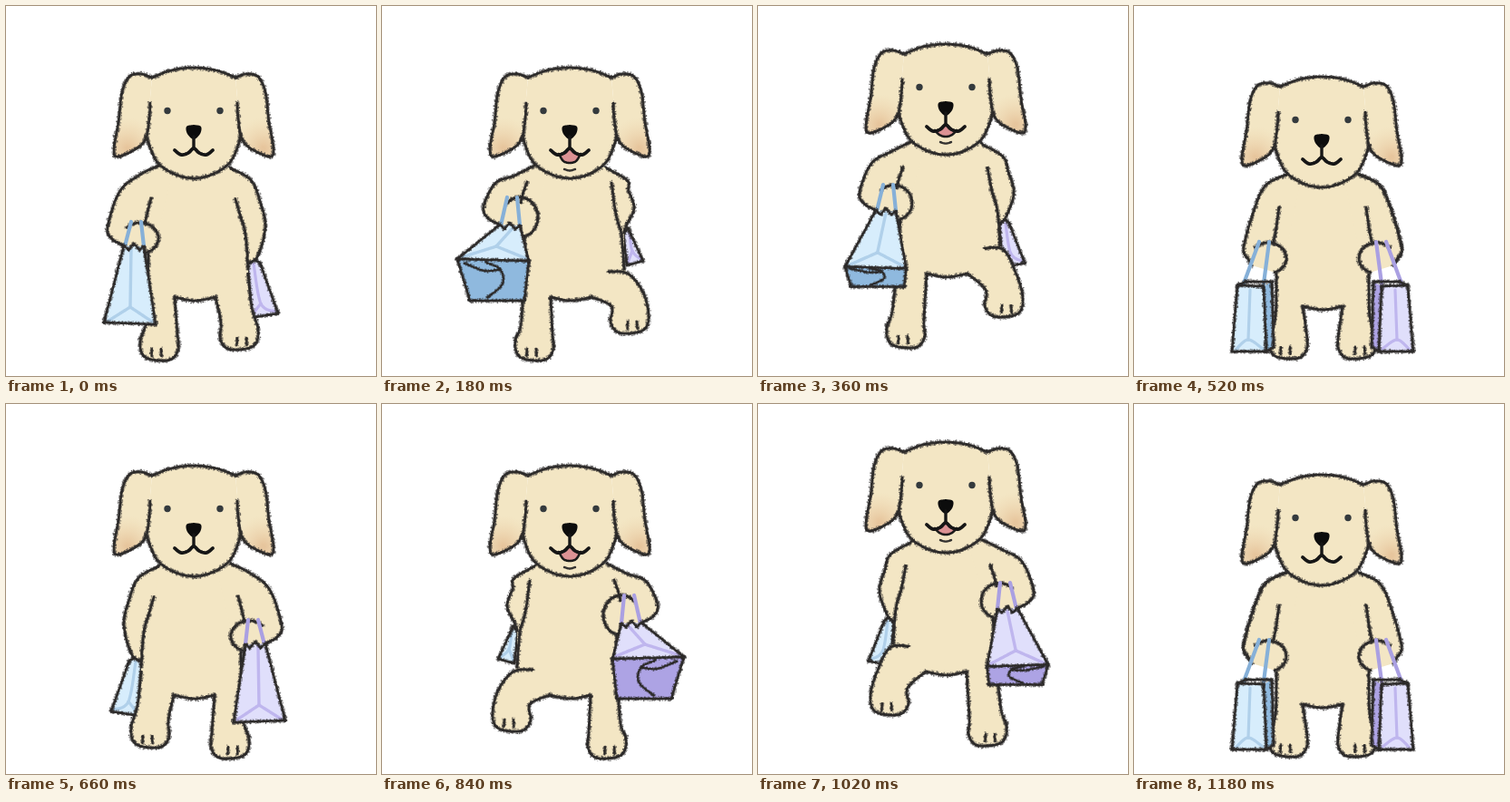
Write an HTML page with a canvas that moves like this. It is 408 by 408 pixels and loops after 1.32 s.

```html
<!DOCTYPE html>
<html lang="en">
<head>
<meta charset="utf-8">
<title>Dancing puppy</title>
<style>
html, body { margin: 0; width: 100%; height: 100%; overflow: hidden; background: #fff; }
canvas { display: block; width: 100vw; height: 100vh; }
</style>
</head>
<body>
<canvas id="stage" width="408" height="408"></canvas>
<script>
const ctx = document.getElementById('stage').getContext('2d');
const INK = '#343230', FUR = '#f3e6c4', AXIS = 416, FACE_AXIS = 414;
const BLUE = { light: '#d7edfc', dark: '#8fb9de', strap: '#86b0d8', fold: '#b0d0ea' };
const LILAC = { light: '#e0dffb', dark: '#ada3e4', strap: '#aaa0e2', fold: '#bfb6ee' };

// y: body offset, swing: front bag towards the viewer, open: mouth,
// hand / farHand: heights, (nx, ny) / (fx, fy): soles. Heights are relative to y.
const stand = { y: 0, swing: 0, open: 0, hand: 256, farHand: 284, knee: 0, nx: 169, ny: 391, fx: 257, fy: 379 };
const kick = { y: 0, swing: 1, open: 1, hand: 233, farHand: 250, knee: 1, nx: 168, ny: 391, fx: 273, fy: 361 };
const hop = { y: -26, swing: 0.48, open: 0.7, hand: 243, farHand: 266, knee: 1, nx: 163, ny: 403, fx: 271, fy: 369 };
const rest = { y: 10, swing: 0, open: 0, hand: 268, nx: 170, ny: 379, both: true };

function mix(a, b, t) {
  const m = {};
  for (const k in a) m[k] = a[k] + (b[k] - a[k]) * t;
  return m;
}

const STEPS = [
  [0, stand],
  [80, { ...mix(stand, kick, 0.5), y: 2 }],
  [180, kick],
  [260, { ...mix(kick, hop, 0.4), y: -51 }],
  [360, hop],
  [440, mix(stand, hop, 0.25)],
  [520, rest]
];
const HALF = 660;

let seed = 1;
function rnd() {
  seed = (seed * 16807) % 2147483647;
  return seed / 2147483647;
}

const flip = (p, axis = AXIS) => p.map((v, i) => i % 2 ? v : axis - v);
function reversed(p) {
  const r = [];
  for (let i = p.length - 2; i >= 0; i -= 2) r.push(p[i], p[i + 1]);
  return r;
}

// Catmull-Rom samples through a flat point list
function spline(p) {
  const n = p.length / 2, out = [];
  const at = (i, c) => p[2 * Math.max(0, Math.min(n - 1, i)) + c];
  for (let i = 0; i < n - 1; i++) {
    const len = Math.hypot(at(i + 1, 0) - at(i, 0), at(i + 1, 1) - at(i, 1));
    const steps = Math.max(1, Math.ceil(len));
    for (let s = i ? 1 : 0; s <= steps; s++) {
      const t = s / steps;
      for (let c = 0; c < 2; c++) {
        const a = at(i - 1, c), b = at(i, c), d = at(i + 1, c), e = at(i + 2, c);
        out.push(b + 0.5 * t * (d - a + t * (2 * a - 5 * b + 4 * d - e + t * (3 * (b - d) + e - a))));
      }
    }
  }
  return out;
}
function trace(p) {
  ctx.beginPath();
  for (let i = 0; i < p.length; i += 2) ctx.lineTo(p[i], p[i + 1]);
}
function fill(p, color) {
  trace(p);
  ctx.closePath();
  ctx.fillStyle = color;
  ctx.fill();
}
function line(p, color, w) {
  trace(spline(p));
  ctx.strokeStyle = color;
  ctx.lineWidth = w;
  ctx.stroke();
}
// Crayon line: thin core with a grainy edge
function crayon(p, w = 3.2) {
  const s = spline(p);
  line(p, INK, w * 0.85);
  ctx.fillStyle = 'rgba(44,43,42,0.5)';
  for (let i = 0; i < s.length; i += 2) {
    for (let k = 0; k < 4; k++) {
      const a = rnd() * 6.283, r = w * (0.3 + 0.62 * rnd()), d = 0.8 + rnd() * 0.8;
      ctx.fillRect(s[i] + Math.cos(a) * r - d / 2, s[i + 1] + Math.sin(a) * r - d / 2, d, d);
    }
  }
}
function edges(p, w = 2.9) {
  for (let i = 0; i < p.length - 2; i += 2) crayon(p.slice(i, i + 4), w);
}
function mirrored(draw) {
  ctx.save();
  ctx.translate(AXIS, 0);
  ctx.scale(-1, 1);
  draw();
  ctx.restore();
}

// Outline from crotch around the foot up to the hip; d is the outward direction
const leg = (cx, x, y, d, hipX, hipY) => [
  cx, 321, x - 20 * d, y - 30, x - 21 * d, y - 13, x - 14 * d, y - 2, x, y,
  x + 17 * d, y - 5, x + 21 * d, y - 22, x + 14 * d, y - 47, hipX, hipY];

function nearArm(h) {
  const x = 112 + Math.max(0, h - 256) * 0.75, y = h - 12;
  return [168, 176, 146, 187, x + 13, 177 + 0.42 * (y - 177), x, y, x + 5, y + 13, 130, h + 8];
}
function farArm(h, s) {
  const x = 286 - 8 * s;
  return [246, 178, 270, 192, x - 6, 181 + 0.33 * (h - 181), x, 181 + 0.6 * (h - 181), x - 8, h - 9, 267, h];
}
const innerArm = P => [160, 212 - 18 * P.swing, 156, P.hand - 28, 153, P.hand - 16];

function handArc(P) {
  const p = [], s = P.swing;
  for (let a = -2.4; a <= 1.5; a += 0.3) {
    p.push(148 + 4 * s + 20 * Math.cos(a), P.hand + (17 + 5 * s) * Math.sin(a));
  }
  return p;
}

function drawBag(P, c) {
  const s = P.swing, ax = 130, ay = P.hand + 8, bx = 152, by = ay + 1;
  const cx = 108 - 25 * s, cy = ay + 85 - 47 * s, dx = 165 - 3 * s, dy = cy + 2;
  const ex = cx + 14 * s, fx = dx - 5 * s, ey = cy + 46 * s;
  const jx = 137 - 11 * s, jy = ay + 68 - 44 * s;
  fill([ax, ay, bx, by, dx, dy, cx, cy], c.light);
  line([ax + 8 + 6 * s, ay + 4, jx, jy], c.fold, 3.4);
  line([cx + 5, cy - 2, jx, jy], c.fold, 3.4);
  line([dx - 4, dy - 3, jx, jy], c.fold, 3.4);
  if (s > 0.1) {
    fill([cx, cy, dx, dy, fx, ey, ex, ey], c.dark);
    const on = (u, v) => [cx + (dx - cx) * u, cy + (ey - cy) * v];
    crayon([...on(0.4, 0.08), ...on(0.6, 0.25), ...on(0.63, 0.6), ...on(0.42, 0.92)], 2.2);
    crayon([...on(0.1, 0.1), ...on(0.38, 0.28), ...on(0.6, 0.25)], 2.2);
    edges([cx, cy, ex, ey, fx, ey, dx, dy]);
  }
  edges([ax, ay, cx, cy, dx, dy, bx, by]);
  edges([ax, ay, 135, ay + 5, 141, ay - 2, 147, ay + 5, bx, by], 2.6);
}

// Bag resting on the floor, seen with its side
function drawBox(c) {
  fill([143, 299, 152, 294, 154, 366, 146, 371], c.dark);
  fill([114, 298, 143, 299, 146, 371, 108, 371], c.light);
  line([128, 303, 126, 358], c.fold, 3.2);
  line([113, 368, 126, 358, 142, 368], c.fold, 3.2);
  edges([114, 298, 108, 371, 146, 371, 143, 299, 114, 298, 123, 294, 152, 294, 154, 366, 146, 371]);
}

function drawFront(P, c) {
  const h = P.hand, arm = nearArm(h), hand = handArc(P);
  const inner = innerArm(P), top = h - 18 - 4 * P.swing, end = P.both ? 296 : h + 9;
  fill([...spline(arm), 165, h + 5, 185, 178], FUR);
  fill([...spline(hand), 130, h + 8], FUR);
  [arm, inner, hand].forEach(p => crayon(p));
  line([138, top, P.both ? 121 : 131, end], c.strap, 4.2);
  line([149, top, P.both ? 143 : 152, end], c.strap, 4.2);
  P.both ? drawBox(c) : drawBag(P, c);
}

function drawFarBag(P, c) {
  const s = P.swing, h = P.farHand, low = h + 58 - 24 * s;
  const p = [266, h, 272, h - 5, 280 - 7 * s, h - 1, 300 - 12 * s, low - 3, 270, low + 2];
  const mx = 281 - 5 * s, my = low - 14;
  fill(p, c.light);
  line([273, h, mx, my, 297 - 12 * s, low - 5], c.fold, 3.2);
  line([mx, my, 271, low - 1], c.fold, 3.2);
  edges([...p, p[0], p[1]]);
}

function toes(x, y) {
  for (const d of [-5, 5]) crayon([x + d, y - 13, x + d * 1.1, y - 5], 2.6);
}

function drawBody(P, c, back) {
  const near = leg(186, P.nx, P.ny, -1, 157, P.hand + 18);
  const far = P.both ? flip(near) : leg(231, P.fx, P.fy, 1, 267 + 4 * P.knee, 295);
  const side = P.both ? flip(innerArm(P))
    : [253, 213 - 18 * P.swing, 258, 230, 264, 252, 267, 290];
  const arm = P.both ? flip(nearArm(P.hand)) : farArm(P.farHand, P.swing);
  const edge = reversed(spline(side));
  if (!P.both) drawFarBag(P, back);
  fill([...spline(arm), ...edge, 225, 178], FUR);
  crayon(arm);
  fill([168, 176, ...reversed(spline(near)), 208, 325, ...spline(far), ...edge, 246, 178], FUR);
  crayon(near);
  crayon([186, 321, 208, 325, 231, 321]);
  crayon(P.knee ? [...far, 267 - 17 * P.knee, 293] : far);
  crayon(side);
  toes(P.nx - 3, P.ny);
  P.both ? toes(AXIS - P.nx + 3, P.ny) : toes(P.fx + 3, P.fy);
  drawFront(P, c);
  if (P.both) mirrored(() => drawFront(P, back));
}

// Left half of the head; the right half is its reflection
const CROWN = [161, 79, 182, 71, 207, 68];
const CHEEK = [155, 145, 166, 171, 185, 185, 207, 190];
const EAR = [161, 79, 149, 75, 136, 78, 128, 95, 124, 128, 119, 158, 124, 166, 146, 156, 155, 145];
const LOBE = [159, 107, 158, 124, 155, 146];
const whole = p => [...p, ...reversed(flip(p, FACE_AXIS)).slice(2)];

function drawEar(p, x) {
  fill(spline(p), FUR);
  ctx.save();
  ctx.clip();
  const g = ctx.createRadialGradient(x, 157, 2, x, 157, 34);
  g.addColorStop(0, 'rgba(224,180,136,0.65)');
  g.addColorStop(1, 'rgba(236,205,165,0)');
  ctx.fillStyle = g;
  ctx.fillRect(x - 40, 117, 80, 80);
  ctx.restore();
}
function dot(x, y, r) {
  ctx.beginPath();
  ctx.arc(x, y, r, 0, 7);
  ctx.fill();
}

function drawHead(open) {
  const crown = whole(CROWN), chin = whole(CHEEK);
  const ear = flip(EAR, FACE_AXIS), lobe = flip(LOBE, FACE_AXIS);
  fill([...spline(crown), ...reversed(spline(chin))], FUR);
  drawEar(EAR, 134);
  drawEar(ear, 284);
  [crown, chin, EAR, ear, LOBE, lobe].forEach(p => crayon(p));
  ctx.fillStyle = '#343a3d';
  dot(178, 115.5, 3.7);
  dot(236, 115.5, 3.7);
  if (open > 0.1) {
    const b = 163 + 10 * open;
    const jaw = [195, 163, 200, b - 2, 207, b, 214, b - 2, 219, 163];
    fill([...spline(jaw), 207, 158], '#dc9294');
    line(jaw, '#1b1b1b', 2.6);
    const y = 167 + 13 * open;
    if (open > 0.6) line([201, y, 207, y + 1.5, 213, y], INK, 2.4);
  }
  fill(spline(whole([207, 131, 199, 133, 200, 141, 207, 147])), '#0c0c0c');
  line([207, 144, 207, 157], '#161616', 3.4);
  line(whole([186, 159, 193, 164, 201, 162, 207, 157]), '#161616', 3.8);
}

function drawPose(P, second) {
  seed = 7;
  ctx.fillStyle = '#fff';
  ctx.fillRect(0, 0, 408, 408);
  ctx.lineCap = ctx.lineJoin = 'round';
  ctx.save();
  ctx.translate(0, P.y);
  if (second) mirrored(() => drawBody(P, LILAC, BLUE));
  else drawBody(P, BLUE, LILAC);
  drawHead(P.open);
  ctx.restore();
}

let shown = -1;
function tick() {
  const t = performance.now() % (2 * HALF), second = t >= HALF;
  const u = second ? t - HALF : t;
  let i = STEPS.length - 1;
  while (u < STEPS[i][0]) i--;
  const id = i + (second ? STEPS.length : 0);
  if (id !== shown) {
    shown = id;
    drawPose(STEPS[i][1], second);
  }
  requestAnimationFrame(tick);
}
tick();
</script>
</body>
</html>
```
